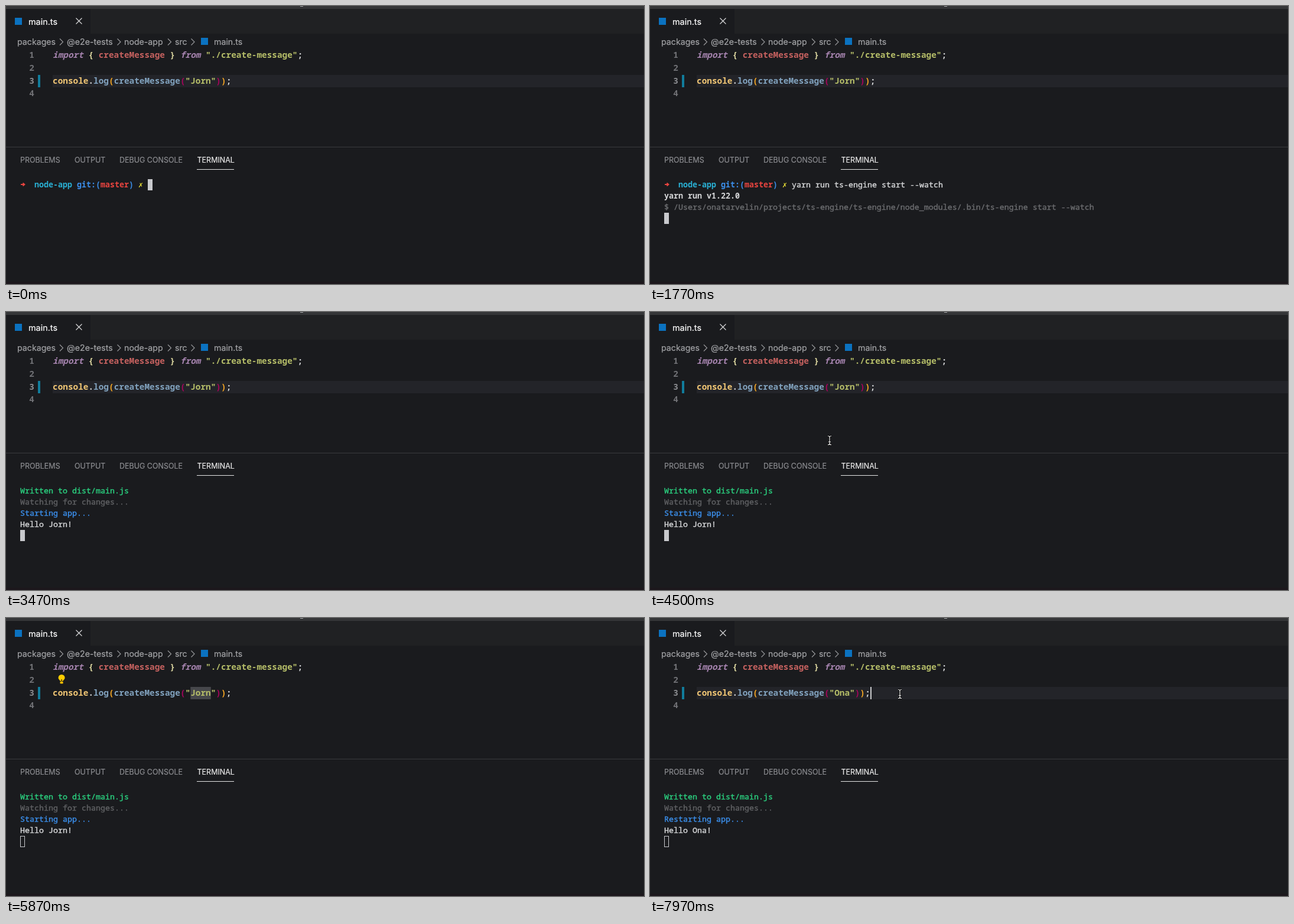
Write an HTML page that moves like this. It is 1080 px wide and 472 px high and loops after 8 s.

```html
<!DOCTYPE html>
<html lang="en">
<head>
<meta charset="utf-8">
<title>Watch mode</title>
<style>
  html, body { margin: 0; width: 100%; height: 100%; overflow: hidden; background: #1a1b1e; }
  svg { display: block; width: 1080px; height: 472px; }
  text { white-space: pre; }
  .ui { font-family: Inter, Roboto, sans-serif; stroke-width: .2; }
  .code { font: 700 14.4px "Noto Sans Mono", "DejaVu Sans Mono", monospace; }
  .term { font: 500 13.333px "Noto Sans Mono", "DejaVu Sans Mono", monospace; stroke-width: .4; }
  .bold { font-weight: 700; stroke-width: 0; }
  .symbol { font-family: "DejaVu Sans Mono", monospace; }
</style>
</head>
<body>
<svg viewBox="0 0 1080 472">
  <g id="chrome"></g>
  <g id="editor"></g>
  <g id="terminal"></g>
  <g id="pointer"></g>
</svg>
<script>
const LOOP = 8000;
const CODE = { x: 79, width: 8.64, baseline: 88, line: 21.75 };
const TERM = { x: 24, width: 8, top: 294, line: 19 };
const OLD_NAME = "Jorn", NEW_NAME = "Ona";
const COMMAND = "yarn run ts-engine start --watch";
const BIN_LINE = "$ /Users/onatarvelin/projects/ts-engine/ts-engine/node_modules/.bin/ts-engine start --watch";

// Moments of the session, in ms
const AT = {
  recall: 30, enter: 1330, version: 1490, binLine: 1560,
  build: 2700, written: 3200, starting: 3250, hello: 3450,
  pointerIn: 4400, click: 4900, select: 5030, bulb: 5300, pointerOut: 5500,
  type: 5950, brackets: 6400, save: 6670,
  rebuild: 6970, rewritten: 7300, restarting: 7340, helloAgain: 7540,
  pointerBack: 7800, clickEnd: 7900
};

const C = {
  text: "#d4d5d7", dim: "#5f6063", green: "#2bd07f", blue: "#3b8eea", cyan: "#29b0d4",
  red: "#e8443f", yellow: "#e5dc35", purple: "#a583ae", brace: "#dcd7a0", variable: "#c5615f",
  string: "#b5bd68", object: "#f0c674", call: "#81a2be", outer: "#f5a623", inner: "#a8045c"
};

const byId = id => document.getElementById(id);
const rect = (x, y, w, h, fill, extra = "") =>
  `<rect x="${x}" y="${y}" width="${w}" height="${h}" fill="${fill}" ${extra}/>`;
const path = (d, stroke, width = 1) =>
  `<path d="${d}" fill="none" stroke="${stroke}" stroke-width="${width}"/>`;
const label = (x, y, size, fill, str) =>
  `<text class="ui" x="${x}" y="${y}" font-size="${size}" fill="${fill}" stroke="${fill}">${str}</text>`;
const between = (t, a, b) => t >= a && t < b;

function drawChrome() {
  const tabs = [[24, "PROBLEMS"], [116, "OUTPUT"], [192, "DEBUG CONSOLE"], [323.5, "TERMINAL"]];
  const crumbs = [[19, "packages"], [103, "@e2e-tests"], [200, "node-app"], [286, "src"], [352, "main.ts"]];
  return rect(0, 0, 1080, 472, "#1a1b1e")
    + rect(0, 5, 1080, 42, "#202123") + rect(0, 5, 143, 42, "#1a1b1e")
    + rect(0, 0, 1080, 5, "#353638") + rect(498, 0, 5, 1, "#aaabad")
    + rect(0, 468, 1080, 4, "#1c171c")
    + rect(15, 20, 12, 12, "#0b72c0") + rect(330, 54, 12, 12, "#0b72c0")
    + label(38, 31.5, 14.4, "#fff", "main.ts")
    + crumbs.map(([x, s]) => label(x, 65.5, 14.2, "#a3a4a7", s)).join("")
    + [91, 188.5, 274, 313.5].map(x => path(`M${x} 55.5l5.5 5.5l-5.5 5.5`, "#96979a", 1.2)).join("")
    + rect(0, 239, 1080, 1, "#3b3c3f")
    + tabs.map(([x, s], i) => label(x, 266, 12.5, i === 3 ? "#e7e7e7" : "#8b8c90", s)).join("")
    + rect(323, 277, 63, 1, "#e7e7e7");
}

const codeX = col => CODE.x + col * CODE.width;
const codeY = row => Math.round(CODE.baseline + row * CODE.line);

function codeLine(row, runs) {
  const spans = runs.map(([fill, str, style = "normal"]) =>
    `<tspan fill="${fill}" font-style="${style}">${str}</tspan>`).join("");
  return `<text class="code" x="${CODE.x}" y="${codeY(row)}">${spans}</text>`;
}

function drawEditor(t) {
  const typed = t < AT.type ? 0 : t < AT.type + 130 ? 1 : t < AT.type + 270 ? 2 : 3;
  const name = typed ? NEW_NAME.slice(0, typed) : OLD_NAME;
  const selected = between(t, AT.select, AT.type);
  const top = 117, height = 21;
  let out = "";

  if (!selected) out += rect(79, top, 1001, height, "#232429");
  else out += rect(codeX(27), top, 4 * CODE.width, height, "#46474b");
  out += rect(54, top, 4, height, "#117d9c");

  for (let row = 0; row < 4; row++) {
    out += `<text class="code" x="48" y="${codeY(row)}" text-anchor="end" fill="${row === 2 ? "#8c8d91" : "#717276"}">${row + 1}</text>`;
  }

  if (between(t, AT.brackets, AT.clickEnd)) {
    for (const col of [25, 28 + name.length]) {
      out += rect(Math.floor(codeX(col)) + .5, top + .5, 8, height - 1, "#14271d", 'stroke="#8a8b8d"');
    }
  }

  out += codeLine(0, [
    [C.purple, "import", "italic"], [C.brace, " { "], [C.variable, "createMessage"], [C.brace, " } "],
    [C.purple, "from", "italic"], [C.string, ' "./create-message"'], [C.text, ";"]
  ]);
  out += codeLine(2, [
    [C.object, "console"], [C.text, "."], [C.call, "log"], [C.outer, "("], [C.call, "createMessage"],
    [C.inner, "("], [C.string, `"${name}"`], [C.inner, ")"], [C.outer, ")"], [C.text, ";"]
  ]);

  if (between(t, AT.bulb, AT.type)) {
    out += '<path d="M91.500 107c0-2-2.900-2.500-2.900-5.500a5.500 5.500 0 0 1 11 0c0 3-2.900 3.500-2.900 5.500z" fill="#fc0"/>'
      + rect(91.5, 108, 5.2, 3.5, "#f5bd00", 'rx="1"') + rect(93, 104, 2.2, 4, "#7a6208");
  }

  let caret = null;
  if (between(t, AT.click, AT.select)) caret = 29;
  if (between(t, AT.type, AT.brackets)) caret = 27 + typed;
  if (t >= AT.clickEnd) caret = 34;
  if (caret !== null) out += rect(Math.round(codeX(caret)), top, 2, height, "#c8c9cb");

  out += between(t, AT.type, AT.save)
    ? '<circle cx="124" cy="26" r="4.5" fill="#e4e4e5"/>'
    : path("M118.5 20.5l10 10M128.5 20.5l-10 10", "#d8d8da", 1.2);
  return out;
}

function termText(row, col, fill, str, cls = "") {
  return `<text class="term ${cls}" x="${TERM.x + col * TERM.width}" y="${TERM.top + row * TERM.line + 14}" fill="${fill}" stroke="${fill}">${str}</text>`;
}

function termCursor(row, col, focused) {
  const x = TERM.x + col * TERM.width, y = TERM.top + row * TERM.line;
  return focused ? rect(x, y, 8, 19, "#c8c9cd")
    : rect(x + .5, y + .5, 7, 18, "none", 'stroke="#c8c9cd"');
}

function prompt() {
  return path("M25 303h6M28.5 300.5l3 2.5l-3 2.5", C.red, 1.8)
    + termText(0, 3, C.cyan, "node-app", "bold")
    + termText(0, 12, C.blue, "git:(", "bold")
    + termText(0, 17, C.red, "master", "bold")
    + termText(0, 23, C.blue, ")", "bold")
    + termText(0, 25, C.yellow, "✗", "bold symbol");
}

function spinner(elapsed) {
  const glyphs = "⠋⠙⠹⠸⠼⠴⠦⠧⠇⠏";
  const bits = glyphs.charCodeAt(Math.floor(elapsed / 80) % glyphs.length) - 0x2800;
  let dots = "";
  for (let i = 0; i < 6; i++) {
    if (bits >> i & 1) dots += rect(26 + 3.5 * Math.floor(i / 3), 298 + 3.6 * (i % 3), 2, 2, C.cyan);
  }
  return dots + termText(0, 2, C.green, "Building bundle");
}

function appOutput(t, starting, hello, verb, name, focused) {
  let row = 2;
  let out = termText(0, 0, C.green, "Written to dist/main.js")
    + termText(1, 0, C.dim, "Watching for changes...");
  if (t >= starting) out += termText(row++, 0, C.blue, verb + " app...");
  if (t >= hello) out += termText(row++, 0, C.text, `Hello ${name}!`);
  return out + termCursor(row, 0, focused);
}

function drawTerminal(t) {
  if (t < AT.recall) return prompt() + termCursor(0, 27, true);
  if (t < AT.build) {
    let out = prompt() + termText(0, 27, C.text, COMMAND);
    if (t < AT.enter) return out + termCursor(0, 27 + COMMAND.length, true);
    let row = 1;
    if (t >= AT.version) out += termText(row++, 0, C.text, "yarn run v1.22.0", "bold");
    if (t >= AT.binLine) out += termText(row++, 0, "#6b6c6f", BIN_LINE);
    return out + termCursor(row, 0, true);
  }
  if (t < AT.written) return spinner(t - AT.build);
  if (t < AT.rebuild) return appOutput(t, AT.starting, AT.hello, "Starting", OLD_NAME, t < AT.click);
  if (t < AT.rewritten) return spinner(t - AT.rebuild);
  return appOutput(t, AT.restarting, AT.helloAgain, "Restarting", NEW_NAME, false);
}

// Eased travel through [time, x, y] stops
function along(stops, t) {
  let i = 0;
  while (i < stops.length - 2 && t > stops[i + 1][0]) i++;
  const [a, b] = [stops[i], stops[i + 1]];
  const k = Math.min(1, Math.max(0, (t - a[0]) / (b[0] - a[0])));
  const ease = 1 - (1 - k) ** 2;
  return [1, 2].map(n => Math.round(a[n] + (b[n] - a[n]) * ease));
}

function drawPointer(t) {
  let stops;
  if (between(t, AT.pointerIn, AT.pointerOut)) stops = [[4400, 285, 400], [4500, 304, 219], [4800, 330, 128]];
  else if (t >= AT.pointerBack) stops = [[7800, 400, 136], [7900, 423, 129]];
  else return "";
  const [x, y] = along(stops, t);
  const beam = `M${x - 3} ${y - 7.5}q3 0 3 2v11q0 2 -3 2M${x + 3} ${y - 7.5}q-3 0 -3 2v11q0 2 3 2M${x - 2} ${y + 2.5}h4`;
  return path(beam, "#000", 3) + path(beam, "#f4f4f4", 1.2);
}

byId("chrome").innerHTML = drawChrome();
const layers = { editor: drawEditor, terminal: drawTerminal, pointer: drawPointer };
const shown = {};

function render(t) {
  for (const id in layers) {
    const markup = layers[id](t);
    if (markup !== shown[id]) byId(id).innerHTML = shown[id] = markup;
  }
}

const start = performance.now();
function tick() {
  render((performance.now() - start) % LOOP);
  requestAnimationFrame(tick);
}
tick();
</script>
</body>
</html>
```
